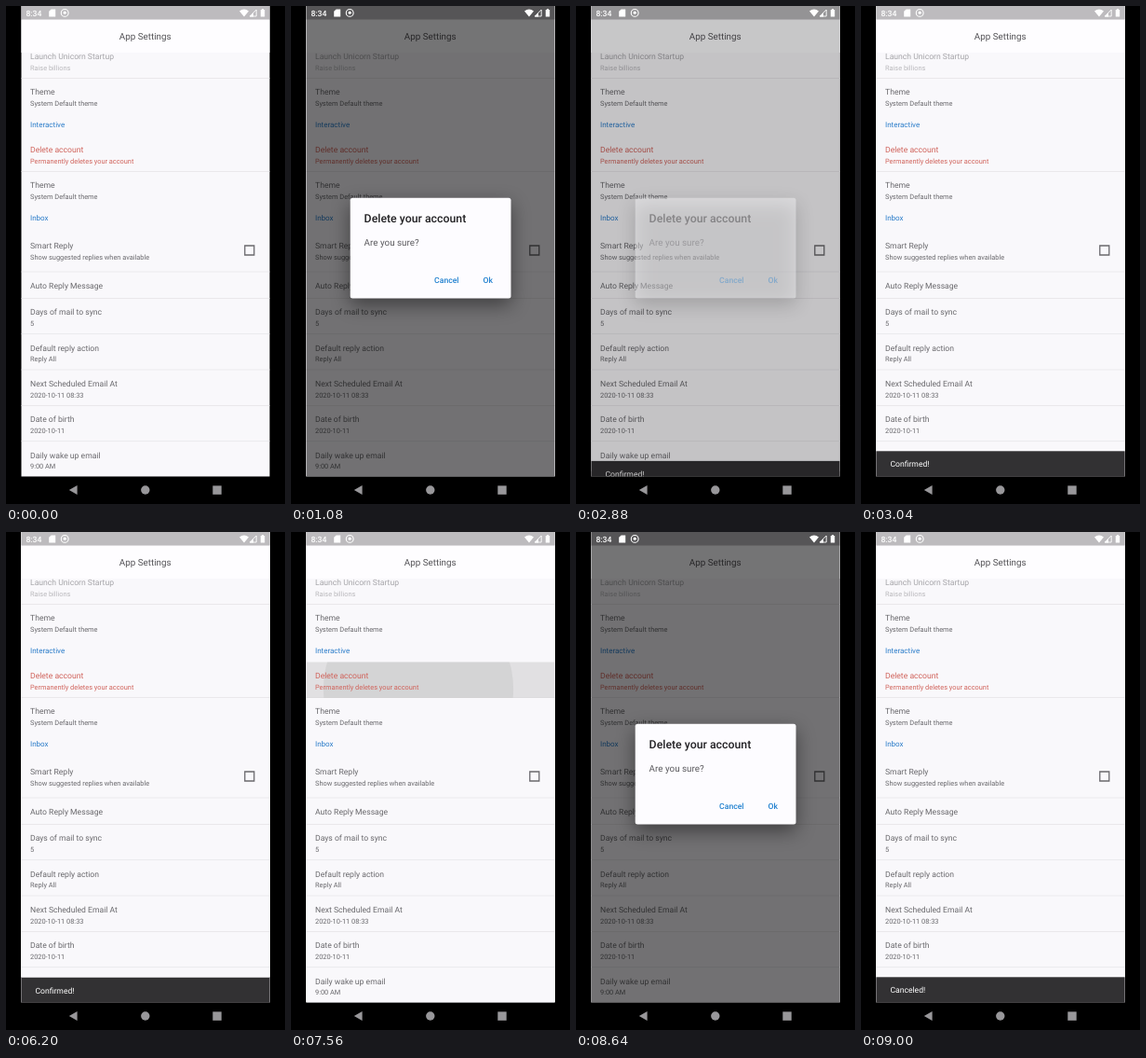
Animation of 300 by 534 pixels, one loop 9080 ms. Source, as an HTML page with a canvas:

```html
<!DOCTYPE html>
<html lang="en">
<head>
<meta charset="utf-8">
<title>App Settings</title>
<style>
  html, body { margin: 0; width: 100%; height: 100%; overflow: hidden; background: #000; }
  canvas { display: block; }
</style>
</head>
<body>
<canvas id="stage" width="300" height="534"></canvas>
<script>
const ctx = document.getElementById('stage').getContext('2d');
ctx.textRendering = 'geometricPrecision';

const LOOP = 9080, STEP = 40;
const LEFT = 16.5, WIDTH = 267, BOTTOM = 504.7;
const SP = 0.616; // pixels per logical unit
const INK = '#69686c', RED = '#d0625a', BLUE = '#2a7cc9';

const rows = [
  { title: 'Launch Unicorn Startup', sub: 'Raise billions', y: 57, color: '#a5a4a8', subColor: '#b9b8bc' },
  { title: 'Theme', sub: 'System Default theme', y: 95 },
  { title: 'Delete account', sub: 'Permanently deletes your account', y: 157, color: RED },
  { title: 'Theme', sub: 'System Default theme', y: 195 },
  { title: 'Smart Reply', sub: 'Show suggested replies when available', y: 259.6, gap: 12.3 },
  { title: 'Auto Reply Message', y: 302.5 },
  { title: 'Days of mail to sync', sub: '5', y: 331.2 },
  { title: 'Default reply action', sub: 'Reply All', y: 369.6 },
  { title: 'Next Scheduled Email At', sub: '2020-10-11 08:33', y: 408 },
  { title: 'Date of birth', sub: '2020-10-11', y: 446.4 },
  { title: 'Daily wake up email', sub: '9:00 AM', y: 484.8 },
];
const dividers = [77.5, 177.5, 285, 313.5, 351.7, 390, 428.5, 466.7];

const clamp = v => Math.max(0, Math.min(1, v));
const progress = (t, start, duration) => clamp((t - start) / duration);

// CSS-style cubic-bezier easing, solved by bisection
function bezier(x1, y1, x2, y2) {
  const at = (a, b, u) => 3 * a * u * (1 - u) ** 2 + 3 * b * u * u * (1 - u) + u ** 3;
  return x => {
    let lo = 0, hi = 1;
    for (let i = 0; i < 20; i++) {
      const mid = (lo + hi) / 2;
      if (at(x1, x2, mid) < x) lo = mid; else hi = mid;
    }
    return at(y1, y2, hi);
  };
}
const easeOut = bezier(0, 0, 0.58, 1);
const fastOutSlowIn = bezier(0.4, 0, 0.2, 1);

function text(str, x, y, size, color = INK, weight = 400, align = 'left') {
  ctx.font = `${weight} ${size * SP}px Roboto, sans-serif`;
  ctx.textAlign = align;
  ctx.fillStyle = color;
  ctx.fillText(str, x, y);
}

function rect(x, y, w, h, color) {
  ctx.fillStyle = color;
  ctx.fillRect(x, y, w, h);
}

function circle(x, y, r, color) {
  ctx.fillStyle = color;
  ctx.beginPath();
  ctx.arc(x, y, r, 0, 7);
  ctx.fill();
}

function shape(path, color) {
  ctx.fillStyle = color;
  ctx.fill(new Path2D(path));
}

function outline(path, color, width) {
  ctx.strokeStyle = color;
  ctx.lineWidth = width;
  ctx.stroke(new Path2D(path));
}

function drawPress(t) {
  if (t < 6880 || t >= 7800) return;
  const released = t - 7600;
  const grow = clamp((Math.min(t, 7560) - 6870) / 1000 + Math.max(0, released) / 260);
  const fade = 1 - clamp(released / 200);
  ctx.save();
  ctx.beginPath();
  ctx.rect(LEFT, 139.5, WIDTH, 38.2);
  ctx.clip();
  ctx.globalAlpha = 0.4 * fade * progress(t, 6870, 200);
  rect(LEFT, 139, WIDTH, 39, '#bcbcbc');
  ctx.globalAlpha = 0.4 * fade;
  circle(108 + 42 * grow, 178 - 14 * grow, 148 * grow, '#c0c0c0');
  ctx.restore();
}

function drawSettings(t) {
  rect(LEFT, 0, WIDTH, BOTTOM, '#f9f8fb');
  rect(LEFT, 14.5, WIDTH, 35.5, '#fefdff');
  rect(LEFT, 0, WIDTH, 14.5, '#bdbbbe');
  text('App Settings', 149.7, 35.6, 16, '#555458', 400, 'center');
  for (const y of dividers) rect(LEFT, y - 0.4, WIDTH, 0.8, '#e6e5e8');
  drawPress(t);
  for (const { title, sub = '', y, color = INK, subColor = color, gap = 11.5 } of rows) {
    text(title, 26, y, 14, color);
    text(sub, 26, y + gap, 12, subColor);
  }
  text('Interactive', 26, 130.2, 13, BLUE);
  text('Inbox', 26, 230.2, 13, BLUE);
  outline('M256.8 257h10v10h-10z', '#69686c', 1.3);
}

function drawDialog(alpha) {
  if (alpha <= 0) return;
  ctx.save();
  ctx.globalAlpha = alpha;
  rect(LEFT, 0, WIDTH, BOTTOM, 'rgba(0,0,0,.54)');
  ctx.shadowColor = 'rgba(0,0,0,.45)';
  ctx.shadowBlur = 20;
  ctx.shadowOffsetY = 7;
  ctx.fillStyle = '#fdfcff';
  ctx.beginPath();
  ctx.roundRect(63.7, 205.8, 172.8, 107.6, 2.5);
  ctx.fill();
  ctx.shadowColor = 'transparent';
  text('Delete your account', 78.6, 232.4, 20, '#222124', 500);
  text('Are you sure?', 78.6, 256.6, 16, '#5c5b5f');
  text('Cancel', 167.3, 296.8, 14, '#2080cf', 500, 'center');
  text('Ok', 211.8, 296.8, 14, '#2080cf', 500, 'center');
  ctx.restore();
}

function drawSnackbar(message, shown) {
  if (shown <= 0) return;
  const top = BOTTOM - 27.4 * shown;
  rect(LEFT, top, WIDTH, BOTTOM - top, '#323133');
  ctx.save();
  ctx.beginPath();
  ctx.rect(LEFT, top, WIDTH, BOTTOM - top);
  ctx.clip();
  text(message, 31.4, top + 16.8, 14, '#fff');
  ctx.restore();
}

function drawSystemBars() {
  text('8:34', 21.4, 10.6, 14, '#fff', 500);
  shape('M48.6 3.4h4.6v8h-7v-5.6z', '#fff');
  ctx.lineWidth = 1.1;
  ctx.strokeStyle = '#fff';
  ctx.beginPath();
  ctx.arc(63.2, 7.4, 3.9, 0, 7);
  ctx.stroke();
  circle(63.2, 7.2, 1.6, '#fff');
  shape('M251 5.4Q256 1.6 261 5.4L256 11.4z', '#fff');
  outline('M269.2 4v7h-7z', '#fff', 0.9);
  shape('M266 7.4v4h-4z', '#fff');
  shape('M273.8 4h1.2v-1h2v1h1.2v7.6h-4.4z', '#fff');

  const nav = '#98979a';
  rect(0, BOTTOM, 300, 30, '#000');
  shape('M67.8 519L76.6 514v10z', nav);
  circle(149.8, 519, 4.7, nav);
  rect(222.3, 514.4, 9.4, 9.4, nav);
}

function dialogAlpha(t) {
  if (t < 1080) return 0;
  if (t < 5000) return easeOut(1 - progress(t, 2770, 150));
  return easeOut(t < 8200 ? progress(t, 7600, 150) : 1 - progress(t, 8730, 150));
}

function draw(now) {
  const t = Math.floor(now % LOOP / STEP) * STEP;
  drawSettings(t);
  if (t < 7000) {
    const shown = t < 5000 ? progress(t, 2780, 250) : 1 - progress(t, 6160, 250);
    drawSnackbar('Confirmed!', shown && fastOutSlowIn(shown));
  } else {
    const shown = progress(t, 8740, 250);
    drawSnackbar('Canceled!', shown && fastOutSlowIn(shown));
  }
  drawDialog(dialogAlpha(t));
  drawSystemBars();
  requestAnimationFrame(draw);
}
requestAnimationFrame(draw);
</script>
</body>
</html>
```
